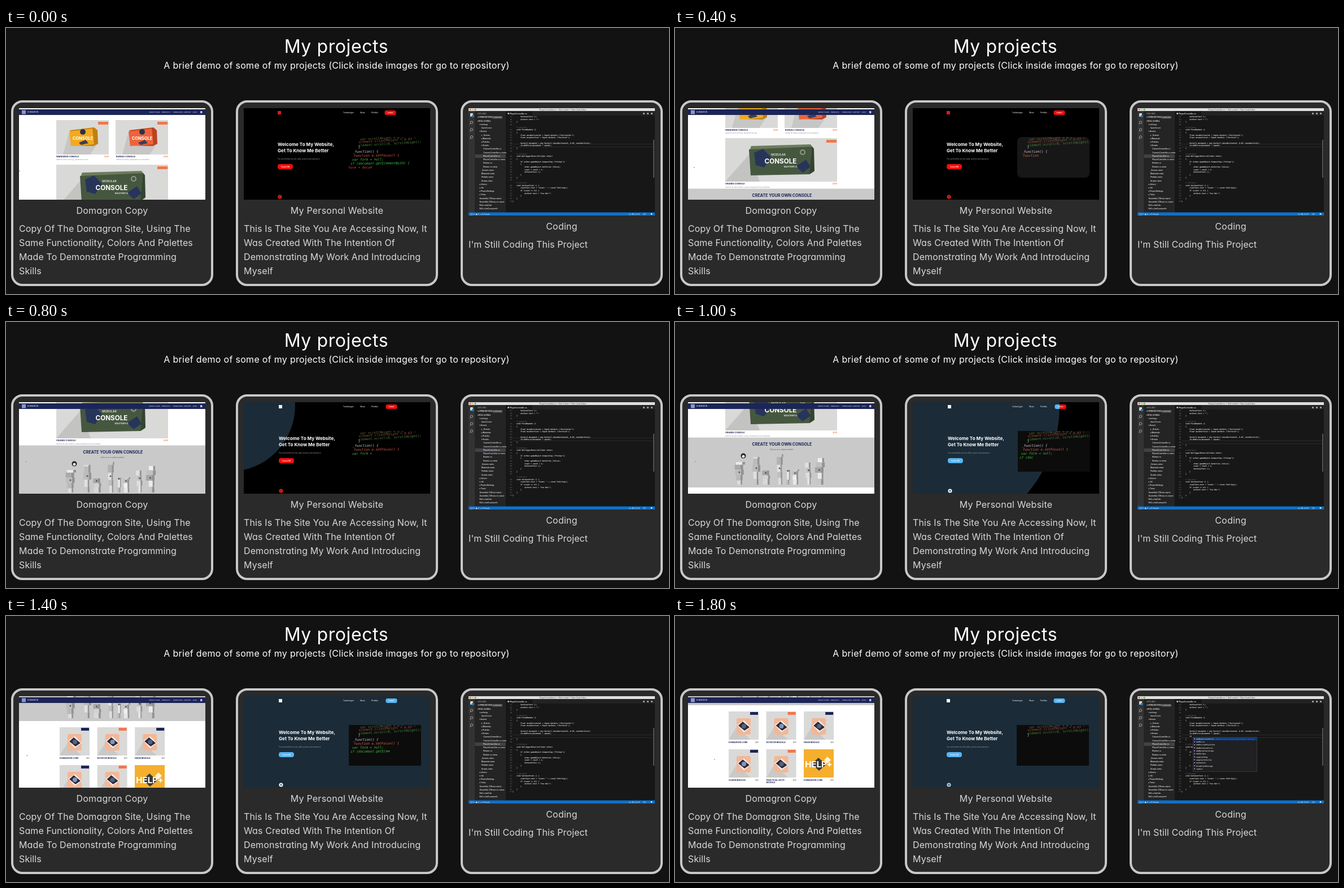
Animation, 1174 px wide and 471 px high, one loop 1900 ms. Source, as an HTML page with a canvas:

```html
<!DOCTYPE html>
<html lang="en">
<head>
<meta charset="utf-8">
<title>My projects</title>
<style>
  html, body { margin: 0; width: 100%; height: 100%; overflow: hidden; background: #121212; }
  body { position: relative; font: 16px/25px Inter, "Open Sans", sans-serif; font-feature-settings: "cv11"; color: #d8d8d8; }
  h1, h2, p { position: absolute; margin: 0; font-weight: 400; white-space: nowrap; }
  h1 { top: 9px; left: 0; width: 1170px; text-align: center; font-size: 32px; line-height: 48px; letter-spacing: .6px; color: #fff; }
  .sub { top: 54px; left: 0; width: 1171px; text-align: center; line-height: 24px; letter-spacing: .3px; color: #fff; }
  .card { position: absolute; top: 128px; width: 350px; height: 321px; border: 4px solid #c8c8c8; border-radius: 20px; background: #2a2a2a; }
  .card h2 { top: 179px; left: 0; width: 100%; text-align: center; font-size: 16px; letter-spacing: .25px; }
  .card p { top: 211px; left: 10px; letter-spacing: .12px; }
  .tall h2 { top: 207px; }
  .tall p { top: 239px; }
  canvas { position: absolute; top: 0; left: 0; width: 1174px; height: 471px; }
</style>
</head>
<body>
<h1>My projects</h1>
<p class="sub">A brief demo of some of my projects (Click inside images for go to repository)</p>
<div class="card" style="left:9px">
  <h2>Domagron Copy</h2>
  <p>Copy Of The Domagron Site, Using The<br>Same Functionality, Colors And Palettes<br>Made To Demonstrate Programming<br>Skills</p>
</div>
<div class="card" style="left:407px">
  <h2>My Personal Website</h2>
  <p>This Is The Site You Are Accessing Now, It<br>Was Created With The Intention Of<br>Demonstrating My Work And Introducing<br>Myself</p>
</div>
<div class="card tall" style="left:805px">
  <h2>Coding</h2>
  <p>I'm Still Coding This Project</p>
</div>
<canvas></canvas>
<script>
const LOOP = 1900;
const SANS = 'Inter, sans-serif', MONO = '"DejaVu Sans Mono", monospace';
const NAVY = '#1c2557', ORANGE = '#f2764a';
const canvas = document.querySelector('canvas');
const g = canvas.getContext('2d');
const dpr = window.devicePixelRatio || 1;
canvas.width = 1174 * dpr;
canvas.height = 471 * dpr;

function rect(x, y, w, h, color, r = 0) {
  g.fillStyle = color;
  g.beginPath();
  g.roundRect(x, y, w, h, r);
  g.fill();
}

function disc(x, y, r, color) {
  g.fillStyle = color;
  g.beginPath();
  g.arc(x, y, r, 0, Math.PI * 2);
  g.fill();
}

function poly(color, ...pts) {
  g.fillStyle = color;
  g.beginPath();
  for (let i = 0; i < pts.length; i += 2) g.lineTo(pts[i], pts[i + 1]);
  g.fill();
}

function text(s, x, y, font, color, align = 'left') {
  g.font = font;
  g.fillStyle = color;
  g.textAlign = align;
  g.fillText(s, x, y);
}

function clipped(x, y, w, h, draw) {
  g.save();
  g.beginPath();
  g.rect(x, y, w, h);
  g.clip();
  draw();
  g.restore();
}

// Piecewise linear track of [time, value] pairs
function track(t, keys) {
  let i = 1;
  while (i < keys.length - 1 && t > keys[i][0]) i++;
  const [t0, v0] = keys[i - 1], [t1, v1] = keys[i];
  const k = Math.min(1, Math.max(0, (t - t0) / (t1 - t0)));
  return v0 + (v1 - v0) * k;
}

const noise = n => {
  const s = Math.sin(n * 127.1) * 43758.5453;
  return s - Math.floor(s);
};

/* Shop page */

function smallBox(x, color, shade) {
  rect(x, 163, 93, 61, '#d9d9d8');
  poly('#c6c6c5', x + 12, 224, x + 24, 180, x + 73, 205, x + 60, 224);
  poly(shade, x + 25, 181, x + 67, 176, x + 73, 181, x + 74, 205, x + 66, 209, x + 26, 208);
  poly(color, x + 23, 183, x + 64, 178, x + 67, 206, x + 26, 209);
  disc(x + 47, 184, 5, '#2c3344');
  poly('#39415a', x + 40, 203, x + 52, 198, x + 57, 204, x + 44, 207);
  text('CONSOLE', x + 47, 197.5, '700 7.5px ' + SANS, '#fff', 'center');
  rect(x + 74, 166, 18, 5, ORANGE);
}

function label(name, x, y, right) {
  text(name, x, y, '700 3.7px ' + SANS, NAVY);
  text('$299', right, y, '600 3px ' + SANS, ORANGE, 'right');
}

function bigBox() {
  rect(89, 242, 198, 77, '#d9d9d8');
  poly('#c3c3c2', 89, 319, 132, 270, 150, 319);
  poly('#6d7c5c', 135, 256, 240, 253, 246, 261, 131, 266);
  poly('#46573f', 131, 262, 243, 257, 246, 301, 238, 306, 134, 308);
  poly('#34442f', 243, 257, 246, 261, 247, 300, 238, 306);
  poly('#28355a', 140, 268, 156, 261, 170, 276, 158, 294, 143, 290);
  poly('#28355a', 214, 292, 232, 280, 240, 293, 226, 303);
  disc(226, 267, 5, '#8e9b86');
  disc(226, 267, 3, '#46573f');
  text('MODULAR', 183, 273, '600 5px ' + SANS, '#e6e9e2', 'center');
  text('CONSOLE', 187, 287, '700 11.7px ' + SANS, '#fff', 'center');
  text('MASTERFUL', 205, 293.5, '600 4px ' + SANS, '#e6e9e2', 'center');
  rect(268, 245, 18, 5, ORANGE);
  label('GRANDE CONSOLE', 89, 324, 287);
  text('Ideal for all-day creation, a desk companion for any workflow.', 89, 329.5, '2.7px ' + SANS, '#888');
}

// Stacked figures made of grey blocks: centre, top, width
const FIGURES = [[115, 375, 16], [143, 366, 15], [162, 390, 13], [187, 361, 11], [200, 389, 9], [214, 388, 12], [236, 376, 10], [257, 368, 15]];

function figures() {
  FIGURES.forEach(([x, top, width], i) => {
    let y = 415;
    for (let j = 0; y > top; j++) {
      const n = i * 9 + j;
      const w = width * (.55 + noise(n) * .5);
      const h = Math.min(y - top, 6 + noise(n + 50) * 8);
      const left = x - w / 2 + noise(n + 7) * 4 - 2;
      const v = 165 + Math.floor(noise(n + 20) * 75);
      y -= h;
      rect(left, y, w, h, `rgb(${v},${v},${v})`);
      rect(left + w * .7, y, w * .3, h, '#929292');
      if (j % 3 == 2) disc(left + w / 2, y + h / 2, 1.5, '#555');
    }
  });
  disc(121, 364, 4.5, '#222');
  disc(121, 365, 2.5, '#eee');
}

function moduleCard(name, x, y, i) {
  rect(x, y, 53, 50, '#d9d9d8');
  poly('#c9c9c8', x, y + 50, x + 15, y + 26, x + 38, y + 50);
  rect(x + 14, y + 12, 25, 29, '#f3b796', 3);
  poly('#f7f2ee', x + 15, y + 24, x + 27, y + 16, x + 39, y + 28, x + 27, y + 37);
  poly('#262b40', x + 17, y + 25, x + 25, y + 18, x + 37, y + 28, x + 28, y + 34);
  disc(x + 27, y + 26, 4, i % 2 ? '#8b93b5' : '#596079');
  rect(x + 38, y + 1, 14, 5, i % 3 == 1 ? ORANGE : NAVY);
  name.split('|').forEach((s, n) => text(s, x, y + 55.5 + n * 4.4, '700 3.7px ' + SANS, NAVY));
  text('$99', x + 53, y + 55.5, '3px ' + SANS, '#555', 'right');
}

function shop(t) {
  rect(23, 142, 330, 162, '#fff');
  const shift = track(t, [[0, 0], [400, 47], [800, 113], [1000, 127], [1200, 209], [1600, 259], [1800, 262]]);
  g.save();
  g.translate(0, -shift);
  smallBox(89, '#f3a91f', '#c17f10');
  smallBox(194, '#f0623a', '#b9431f');
  label('WANDERER CONSOLE', 89, 228.5, 182);
  label('BUREAU CONSOLE', 195, 228.5, 287);
  text('Made for work on the go, anywhere you like.', 89, 234, '2.7px ' + SANS, '#888');
  text('Perfect for editors, adaptable to any workflow.', 195, 234, '2.7px ' + SANS, '#888');
  bigBox();
  rect(23, 331.5, 330, 88.5, '#c9c9c9');
  text('CREATE YOUR OWN CONSOLE', 189.5, 346, '700 7.1px ' + SANS, NAVY, 'center');
  text('Click on us to make it perfect.', 189, 354, '3px ' + SANS, '#555', 'center');
  figures();
  const names = ['DOMAGRON CORE', 'ROTATOR MODULE', 'KNOB MODULE', 'GLIDER MODULE', 'PRACTICAL KEYS|MODULE'];
  names.forEach((s, i) => moduleCard(s, 95 + i % 3 * 66.6, 431 + Math.floor(i / 3) * 67, i));
  rect(228, 498, 53, 50, '#f5af2d');
  poly('#3b3a3a', 242, 524, 254, 513, 268, 525, 255, 536);
  poly('#fff3d8', 264, 517, 270, 511, 276, 517, 270, 523);
  text('HELP+', 254.5, 530, '700 15px ' + SANS, '#fff', 'center');
  text('DOMAGRON CORE', 228, 553.5, '700 3.7px ' + SANS, NAVY);
  text('$49', 281, 553.5, '3px ' + SANS, '#555', 'right');
  g.restore();

  rect(23, 144, 330, 10, NAVY);
  rect(28, 145.5, 7, 7, '#8d95c0');
  text('DOMAGRON', 38, 150, '600 3.2px ' + SANS, '#b9c0e0');
  ['CREATE YOURS', 'PRODUCTS', 'DOWNLOADS', 'SUPPORT', 'BLOG'].forEach((s, i) =>
    text(s, [253, 276, 296, 315, 331][i], 150, '600 2.6px ' + SANS, '#b9c0e0'));
  rect(344, 147, 3.5, 4, '#b9c0e0', 1);
  disc(track(t, [[0, 24], [400, 34], [1600, 38], [1800, 70]]), track(t, [[0, 253], [400, 247], [1600, 247], [1800, 254]]), .9, '#999');
}

/* Personal site */

function site(x, bg, accent, mark, dot) {
  rect(421, 142, 330, 162, bg);
  rect(x, 147, 6, 6, mark);
  text('Technologies', 597, 151.3, '600 2.9px ' + SANS, '#ddd');
  text('About', 627, 151.3, '600 2.9px ' + SANS, '#ddd');
  text('Portfolio', 647, 151.3, '600 2.9px ' + SANS, '#ddd');
  rect(x + 189.5, 146, 20, 8, accent, 3);
  text('Contact', x + 199.5, 151, '600 2.6px ' + SANS, '#fff', 'center');
  text('Welcome To My Website,', x, 209, '700 8.1px ' + SANS, '#fff');
  text('Get To Know Me Better', x, 220, '700 8.1px ' + SANS, '#fff');
  text('You can find here my info, skills, projects and experience', x, 232.5, '2.75px ' + SANS, '#a8a8a8');
  rect(x, 241, 27, 9, accent, 4);
  text('Contact Me', x + 13.5, 246.5, '600 2.8px ' + SANS, '#fff', 'center');
  disc(x + 4, 299, 3.6, dot);
  disc(x + 4, 299, 1.2, '#333');
}

const TYPED = [
  ['_function() {', 614, 221, '#ddd'],
  ['function e.setFocus() {', 616, 228, '#e06a5a'],
  ['var form = null;', 613, 235, '#4fc24f'],
  ['if (document.getElementById) {', 610, 242, '#3fd03f'],
  ['form = docum', 606, 249, '#d84a4a']
];

function slanted(s, x, y, color, angle) {
  g.save();
  g.translate(x, y);
  g.rotate(angle);
  text(s, 0, 0, 'italic 5.8px ' + MONO, color);
  g.restore();
}

function screenCode(x, t) {
  if (t >= 300 && t < 500) rect(x + 125, 193, 128, 72, '#171717', 8);
  else if (t >= 900) rect(x + 124, 193, 128, 72, '#0c0c0c');
  clipped(x + 124, 193, 130, 72, () => {
    slanted('var scrollHeight = 0.3', 627, 199, '#66713f', -.05);
    slanted('element.clientHeight + 0.03 "', 625, 204, '#a1483a', -.06);
    slanted('element.scroll(0, scrollHeight);', 624, 210, '#4a8a3f', -.06);
    slanted('}', 624, 213, '#bbb', 0);
    const count = t < 200 ? 94 : t >= 1800 ? 0 :
      track(t, [[200, 0], [400, 21], [800, 47], [1000, 59], [1200, 64], [1600, 80], [1700, 88]]);
    let left = Math.round(count);
    for (const [s, px, y, color] of TYPED) {
      if (left > 0) slanted(s.slice(0, left), px, y, color, -.01);
      left -= s.length;
    }
  });
}

function personal(t) {
  const x = t < 700 || t >= 1700 ? 481 : 483;
  if (t < 1400) site(x, '#000', '#f80c0c', '#e01818', '#e01818');
  if (t >= 700) {
    g.save();
    if (t < 1400) {
      g.beginPath();
      g.arc(track(t, [[700, 372], [800, 395], [1000, 441], [1200, 445]]), 148,
        track(t, [[700, 60], [800, 117], [1000, 240], [1200, 292]]), 0, Math.PI * 2);
      g.clip();
    }
    site(x, '#1b2b38', '#57b5f2', '#eef3f6', t >= 1800 ? '#9cc7ea' : '#e9eef2');
    g.restore();
  }
  screenCode(x, t);
}

/* Code editor */

const FILES = `0▾ OPEN EDITORS
0▾ ROLL-A-BALL
1▾ settings
2launch.json
1▾ Assets
2▸ _Scenes
2▸ Materials
2▸ Prefabs
2▾ Scripts
3CameraController.cs
3CameraController.cs.meta
3PlayerController.cs
3PlayerController.cs.meta
3Rotator.cs
3Rotator.cs.meta
2_Scenes.meta
2Materials.meta
2Prefabs.meta
2Scripts.meta
1▸ Library
1▸ obj
1▸ ProjectSettings
1▸ Temp
1Assembly-CSharp.csproj
1Assembly-CSharp-vs.csproj
1Roll-a-ball.sln
1Roll-a-ball.userprefs`.split('\n');

const CODE = `2SetCountText ();
2winText.text = "";
1}

1#0 references
1void FixedUpdate ()
1{
2float moveHorizontal = Input.GetAxis ("Horizontal");
2float moveVertical = Input.GetAxis ("Vertical");

2Vector3 movement = new Vector3 (moveHorizontal, 0.0f, moveVertical);
2rb.AddForce(movement * speed);
1}

1#0 references
1void OnTriggerEnter(Collider other)
1{
2if (other.gameObject.CompareTag ("Pickup"))
2{
3other.gameObject.SetActive (false);
3count = count + 1;
3SetCountText ();
2}
1}

1#2 references
1void SetCountText () {
2countText.text = "Count: " + count.ToString();
2if (count >= 12) {
3winText.text = "You Win!";
2}
1}
0}`.split('\n');

const HINTS = ['AddExplosionForce', 'AddForce', 'AddForceAtPosition', 'AddRelativeForce', 'AddRelativeTorque', 'AddTorque', 'angularDrag', 'angularVelocity', 'animation', 'BroadcastMessage', 'camera'];

function popup(t) {
  const full = t >= 1700;
  const x = full ? 917 : 914, w = full ? 114 : 115, h = full ? 61 : 15;
  rect(x, 214.5, w, h, '#555');
  rect(x + .5, 215, w - 1, h - 1, '#202022');
  rect(x + .5, 215, w - 1, 5.2, '#0b3a78');
  HINTS.slice(0, full ? 11 : 3).forEach((s, i) => {
    rect(x + 2, 216.5 + i * 5.3, 2, 2, '#9a7fc0');
    text(s, x + 6, 218.8 + i * 5.3, 'bold 3.05px ' + MONO, '#d4d4d4');
  });
  if (full) text('AddExplosionForce(float explosionForce, Vector3)', x + 40, 218.8, '2.4px ' + MONO, '#5ea2e8');
}

function editor(t) {
  rect(819, 142, 330, 190, '#171717');
  rect(819, 147, 11.5, 180, '#333');
  rect(830.5, 147, 54.5, 180, '#242425');
  rect(885, 147, 264, 8, '#222');
  rect(885, 147, 47, 8, '#171717');
  rect(819, 142, 330, 5, '#dedede');
  ['#f65f57', '#fbbc2e', '#28c840'].forEach((c, i) => disc(822 + i * 4.5, 144.5, 1.5, c));
  text('PlayerController.cs — Roll-a-ball — Plain Code Editor', 986, 145.8, '3.3px ' + SANS, '#444', 'center');
  text('● PlayerController.cs', 888, 152.5, '600 3.3px ' + SANS, '#eee');
  for (let i = 0; i < 3; i++) rect(1128 + i * 7, 150, 3, 3, '#999');

  rect(822, 151, 5, 6, '#ddd', 1);
  disc(826.5, 156, 2.2, '#1482dc');
  g.strokeStyle = '#aaa';
  g.lineWidth = .9;
  for (let i = 0; i < 3; i++) {
    g.beginPath();
    g.arc(824.5, 167 + i * 13, 2.2, 0, Math.PI * 2);
    g.moveTo(823, 168.5 + i * 13);
    g.lineTo(821.5, 170.5 + i * 13);
    g.stroke();
  }

  text('EXPLORER', 835, 153, '3px ' + SANS, '#bbb');
  rect(830.5, 223.8, 54.5, 6.3, '#414146');
  rect(861, 156, 18, 4.5, '#555', 1);
  text('1 UNSAVED', 870, 159.4, '2.7px ' + SANS, '#ddd', 'center');
  FILES.forEach((s, i) => text(s.slice(1), 835 + s[0] * 3.4, 159.4 + i * 6.23, (i < 2 ? '700 ' : '600 ') + '3.2px ' + SANS, '#e0e0e0'));

  const added = t >= 1000;
  const pitch = 4.68;
  rect(897, added ? 210 : 205.2, 249, .6, '#3c3c3c');
  rect(897, added ? 215.2 : 210.4, 249, .6, '#3c3c3c');
  const lines = CODE.slice();
  if (added) lines.splice(12, 0, t >= 1500 ? '2rb' : '');
  let num = 27;
  lines.forEach((s, i) => {
    const y = 158 + i * pitch;
    const ref = s[1] == '#';
    if (!ref) text(num++, 896, y, '3.05px ' + MONO, '#7a7a7a', 'right');
    if (s) text(s.slice(ref ? 2 : 1), 897 + s[0] * 7, y, (ref ? '2.6px ' : 'bold 3.05px ') + MONO, ref ? '#888' : '#f0f0f0');
  });
  rect(1146, 198, 2, 67, '#555');
  if (t >= 1600) popup(t);

  rect(819, 326.5, 330, 5.5, '#0f70c8');
  text('⊗ 0  ⚠ 4   ▸ 5 Assets', 822, 330.6, '3.3px ' + SANS, '#fff');
  text(`Ln ${added ? 39 : 38}, Col 9`, 1103, 330.6, '3.3px ' + SANS, '#fff');
  text('C#', 1128, 330.6, '3.3px ' + SANS, '#fff');
  disc(1143, 329.3, 1.3, '#fff');
}

function draw(now) {
  // The picture advances in 100 ms steps with a longer hold at 0 and 1200
  let t = Math.floor(now % LOOP / 100) * 100;
  if (t == 100 || t == 1300) t -= 100;
  g.setTransform(dpr, 0, 0, dpr, 0, 0);
  g.clearRect(0, 0, 1174, 471);
  clipped(23, 142, 330, 162, () => shop(t));
  clipped(421, 142, 330, 162, () => personal(t));
  clipped(819, 142, 330, 190, () => editor(t));
}

const start = performance.now();
function tick() {
  draw(performance.now() - start);
  requestAnimationFrame(tick);
}
tick();
</script>
</body>
</html>
```
